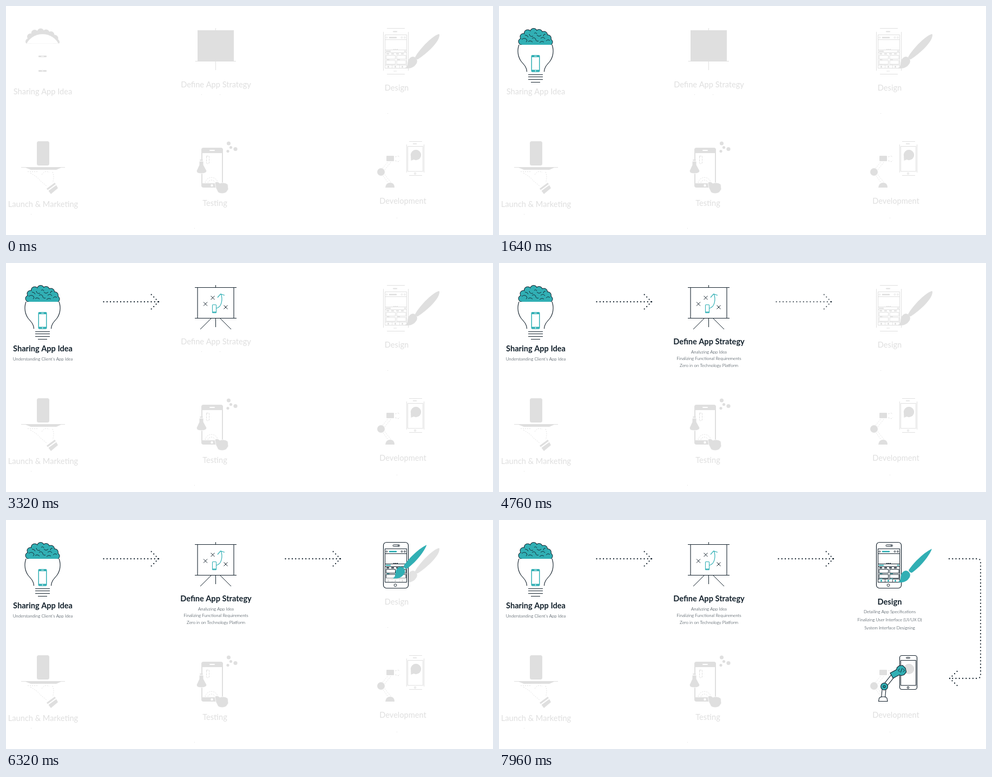
An HTML page with a canvas for the animation above (8000 ms loop, 900 by 425 pixels).

```html
<!DOCTYPE html>
<html lang="en">
<head>
<meta charset="utf-8">
<title>App process</title>
<style>
html, body { margin: 0; width: 100%; height: 100%; overflow: hidden; background: #fff; }
canvas { display: block; width: 900px; height: 425px; }
</style>
</head>
<body>
<canvas id="stage" width="900" height="425"></canvas>
<script>
const LOOP = 8000;
const INK = '#13212c', TEAL = '#31afb4', GREY = '#dfdfdf', WHITE = '#fff';
const ctx = document.getElementById('stage').getContext('2d');

const clamp = v => Math.min(1, Math.max(0, v));
const span = (t, a, b) => clamp((t - a) / (b - a));
const mix = (a, b, p) => a + (b - a) * p;
const easeOut = p => 1 - (1 - p) ** 3;
const easeInOut = p => p * p * (3 - 2 * p);

function layer(alpha, draw) {
  if (alpha <= 0) return;
  ctx.save();
  ctx.globalAlpha *= alpha;
  draw();
  ctx.restore();
}
function clipBox(x, y, w, h) {
  ctx.beginPath();
  ctx.rect(x, y, w, h);
  ctx.clip();
}
function paint(path, fill, stroke, width = 1.1) {
  if (fill) { ctx.fillStyle = fill; ctx.fill(path); }
  if (stroke) { ctx.strokeStyle = stroke; ctx.lineWidth = width; ctx.stroke(path); }
}
const shape = (d, fill, stroke, width) => paint(new Path2D(d), fill, stroke, width);
const line = (d, color = INK, width = 1.1) => shape(d, null, color, width);
function disc(x, y, r, fill, stroke, width) {
  const p = new Path2D();
  p.arc(x, y, r, 0, Math.PI * 2);
  paint(p, fill, stroke, width);
}
function box(x, y, w, h, r, fill, stroke, width) {
  const p = new Path2D();
  p.roundRect(x, y, w, h, r);
  paint(p, fill, stroke, width);
}
function dashed(d, dash, color, width) {
  ctx.save();
  ctx.setLineDash(dash);
  line(d, color, width);
  ctx.restore();
}
function dotted(d) {
  ctx.save();
  ctx.lineCap = 'round';
  ctx.setLineDash([0, 6.28]);
  line(d, INK, 2.3);
  ctx.restore();
}
function text(str, x, y, font, color) {
  ctx.font = font;
  ctx.textAlign = 'center';
  ctx.fillStyle = color;
  ctx.fillText(str, x, y);
}

function label(str, x, y) {
  text(str, x, y, '400 14.6px Lato, sans-serif', GREY);
}
function caption(alpha, title, x, y, lines, firstY, step) {
  layer(1 - alpha, () => label(title, x, y));
  layer(alpha, () => {
    text(title, x, y, '700 14.6px Lato, sans-serif', INK);
    lines.forEach((s, i) => text(s, x, firstY + i * step, '300 8px Lato, sans-serif', INK));
  });
}

// Idea: bulb with brain
const LOBES = [[42, 66, 6], [45, 57, 6], [53, 50.5, 6.5], [64, 48, 6.5],
  [74, 50, 6.5], [83, 53.5, 6.5], [90, 60, 6.5], [93, 67, 6]];
const FOLDS = 'M42 62q5-4 9 0q2 3-1 5 M48 54q5 0 6 4 M56 52q1 6 7 4 M61 60q5-3 7 2q0 4 5 3' +
  ' M54 66q4-3 8 1 M70 54q4 4 8 0 M77 60q5-4 8 1 M75 68q4-4 8-1 M87 65q3-4 7-1 M65 51q3-3 5 1 M82 56q0-4 4-4';
function lobes(color, grow) {
  LOBES.forEach(([x, y, r]) => disc(x, y, r + grow, color));
  shape('M42 73L45 57 54 50 64 48 74 50 84 54 90 60 93 73Z', color);
}
function brain(dy) {
  ctx.save();
  clipBox(30, 35, 75, 37);
  ctx.translate(0, dy);
  lobes(INK, .5);
  lobes(TEAL, -.5);
  line(FOLDS, INK, .9);
  ctx.restore();
}
const DOME = 'M37 72A33.4 33.4 0 0 1 98 72';
function greyIdea() {
  ctx.save();
  clipBox(30, 35, 75, 34.5);
  lobes(GREY, 0);
  shape(DOME + 'Z', WHITE);
  ctx.restore();
  box(60, 92, 15, 3, 1, GREY);
  box(60, 119, 15, 3, 1, GREY);
  box(65, 93, 5, 1, 0, WHITE);
  box(66, 120, 3, 1, 0, WHITE);
}
function idea(t) {
  greyIdea();
  layer(span(t, 20, 400), () => {
    line('M37 72A33.4 33.4 0 0 0 41.5 103.5C47.5 110 51.5 115 51.5 122');
    line('M98 72A33.4 33.4 0 0 1 93.5 103.5C87.500 110 83.5 115 83.5 122');
    line('M54 127.5H81M54 131.5H81M54 136.5H81M59 141.5H76');
    if (t < 1640) line('M37 72H98', INK, .8);
    layer(1 - span(t, 920, 1120), () => {
      ctx.translate(98, 72);
      ctx.rotate(span(t, 600, 1040) * Math.PI / 2);
      ctx.translate(-98, -72);
      line(DOME);
    });
  });
  if (t >= 720) brain(31 * (1 - easeOut(span(t, 720, 1640))));
  if (t >= 600) {
    ctx.save();
    clipBox(52, 85, 32, 41);
    ctx.translate(0, 36 * (1 - easeOut(span(t, 600, 960))));
    box(59.5, 91, 16, 31.5, 2, TEAL);
    box(61, 95, 13, 23.5, 0, WHITE);
    box(65, 92.6, 5, 1, .5, WHITE);
    disc(67.5, 120.5, 1, WHITE);
    ctx.restore();
  }
}

// Strategy: board on an easel
function board(t) {
  box(354, 45, 67, 58, 0, GREY);
  line('M349.5 102.5H425M387.5 41V45M387.5 103V119', GREY, 1);
  layer(span(t, 2800, 2960), () =>
    line('M387.5 41V45M387.5 103V119M379 103L359 123M396 103L416 123', INK, 1));
  if (t < 2960) return;
  const y = mix(45.5, 102.5, easeInOut(span(t, 2960, 3320)));
  ctx.save();
  clipBox(345, 40, 85, y - 39);
  box(354, 45, 67, 58, 0, WHITE);
  line('M354 45V103M421 45V103');
  [[368.5, 76], [382, 64.5], [406, 82]].forEach(([cx, cy]) =>
    line(`M${cx - 3.5} ${cy - 3.5}l7 7m0-7l-7 7`, INK, 1));
  box(381.5, 77.5, 7, 15, 1, WHITE, TEAL);
  line('M381.5 91h7', TEAL, 1.6);
  line('M389 84C398 82 401 69 397.5 58M391 64L396.5 57.5 404 60', TEAL, 1.2);
  ctx.restore();
  line(`M349 45.5H426M349 ${y}H426`);
}

// Design: phone and brush
function screen(ink, accent) {
  box(700.5, 53.5, 40, 62, 0, null, ink, 1);
  line('M700.5 62.5h40M700.5 81.5h40M700.5 86.5h40M700.5 109.5h40', ink, 1);
  disc(703.5, 58.5, 1.3, null, ink, .9);
  box(708, 57.3, 14, 2.6, 0, accent);
  disc(731.5, 58.5, 1.4, null, ink, .9);
  disc(737, 58.5, 1.4, null, ink, .9);
  dashed('M716 80.5h9', [2, 1], ink, 1.4);
  box(702, 83, 9, 2, 0, accent);
  box(736, 83, 3, 2, 0, accent);
  dashed('M703 88.8h36', [5, 4], ink, 2);
  for (let i = 0; i < 4; i++) {
    const x = 702.5 + i % 2 * 19.5, y = 91.5 + (i >> 1) * 9.5;
    box(x, y, 17, 7, 0, WHITE, ink, 1);
    line(`M${x + 1} ${y + 8.3}h5`, accent, 1.2);
  }
  dashed('M705 112.8h33', [3, 10], accent, 3);
  line('M713.5 110v5M727.5 110v5', ink, .8);
}
const BRISTLES = 'M737 115C745 113 740 104 745 98Q751 91 757 96Q763 102 757 109C752 116 742 117 737 115Z';
const BRUSH_KEYS = [[4840, 700, 24], [5000, 703, 61], [5280, 736, 67], [5520, 703, 75],
  [5800, 714, 84], [6000, 738, 93], [6220, 704, 104], [6480, 738, 115]];
function brushTip(t) {
  let i = 0;
  while (i < BRUSH_KEYS.length - 2 && t >= BRUSH_KEYS[i + 1][0]) i++;
  const [a, ax, ay] = BRUSH_KEYS[i], [b, bx, by] = BRUSH_KEYS[i + 1];
  const p = easeInOut(span(t, a, b));
  return [mix(ax, bx, p), mix(ay, by, p)];
}
function design(t) {
  line('M697.5 48V120M743.5 48V120M704 41.5H737M704 126.5H737', GREY, 1);
  box(715, 46.5, 8, 2, 1, GREY);
  dashed('M717 121h6', [1, 2], GREY, 3);
  layer(1 - span(t, 6300, 6480), () => {
    shape('M800 52C790 54 765 78 756 95Q757 99 761 99C778 88 802 66 801 53Z', GREY);
    shape(BRISTLES, GREY);
  });
  layer(span(t, 4800, 4960), () => {
    box(697.5, 41.5, 46, 85, 5.5, WHITE, INK, 1.2);
    box(715, 46, 12.5, 3, 1.5, null, INK, 1);
    disc(725, 47.5, .9, INK);
    box(717.3, 118.8, 4.4, 4.4, 1.5, null, INK, 1);
  });
  screen(GREY, GREY);
  if (t < 4840) return;
  const [x, y] = brushTip(t);
  layer(span(t, 4880, 4960), () => box(700.5, 53.5, 40, 62, 0, null, INK, 1));
  ctx.save();
  clipBox(698, 50, 46, Math.max(0, t >= 6480 ? 70 : y - 50));
  screen(INK, TEAL);
  ctx.restore();
  ctx.save();
  ctx.translate(x - 738, y - 115);
  shape('M800 53.5C787 59 767 78 757 93Q758 97 762.5 98C773 92 794 70 800 53.5Z', TEAL);
  shape(BRISTLES, TEAL);
  ctx.restore();
}

// Development: robot arm and phone
function greyDevelopment() {
  line('M740.5 257V309M772.5 257V309M745 251.5H769M745 314.5H769', GREY, 1);
  box(742.5, 260.5, 28, 46.5, 0, null, GREY, 1);
  box(752, 255, 7, 1.5, .5, GREY);
  disc(756, 311, 1.5, null, GREY, 1);
  disc(757.5, 276.5, 9.7, GREY);
  shape('M748 279L748.5 287 756 284Z', GREY);
  disc(693, 308, 7, GREY);
  shape('M701 337Q702 328 710 328Q718 328 718 337Z', GREY);
  box(703, 278, 14, 10, 1, GREY);
  dashed('M696 301L706 289M700 304L712 289M697 315L706 328M700 313L711 327', [2, 2], GREY, .9);
  dashed('M719 280L725 278.5 728 281M719 287L725 289 728 286', [3, 2], GREY, .9);
}
function limb(x1, y1, x2, y2, w) {
  const d = `M${x1} ${y1}L${x2} ${y2}`;
  line(d, INK, w);
  line(d, WHITE, w - 2.2);
}
function development(t) {
  greyDevelopment();
  layer(span(t, 7520, 7720), () => {
    box(740.5, 251.5, 32, 63, 4, null, INK, 1.2);
    box(742.5, 260.5, 28, 46.5, 0, null, INK, 1);
    box(752.5, 254.8, 7, 2, 1, null, INK, .9);
    disc(756, 311, 1.7, null, INK, 1);
  });
  layer(span(t, 7380, 7500), () => {
    const p = easeInOut(span(t, 7500, 7960));
    const jx = mix(693, 712, p), jy = mix(308, 309, p);
    const hx = mix(710, 730, p), hy = mix(283, 286.5, p);
    const tilt = mix(0, -.5, p);
    limb(710, 331, jx, jy, 8);
    shape('M701.5 336.5L702.5 331Q704 328 710 328Q716 328 717 331L718 336.5Z', WHITE, INK);
    limb(jx, jy, hx, hy, 8);
    disc(jx, jy, 6.5, TEAL, INK);
    disc(jx, jy, 2, null, INK);
    ctx.translate(hx, hy);
    ctx.rotate(tilt);
    shape('M-5-5.5H8L11-8.500 16-9.500 22-7 24 0 22 7 16 9.5 11 8.5 8 5.5H-5Z', TEAL, INK);
    ctx.translate(15.5, 0);
    ctx.rotate(-tilt);
    line('M-3-3L-6 0-3 3M3-3L6 0 3 3M1.5-4L-1.5 4', INK, 1);
  });
}

function testing() {
  box(362, 264, 38, 72, 4, null, GREY, 2);
  box(361, 263, 40, 10, [4, 4, 0, 0], GREY);
  box(361, 329, 40, 8, [0, 0, 4, 4], GREY);
  box(376, 267, 10, 2, 1, WHITE);
  disc(380.5, 333, 2.2, WHITE);
  dashed('M370 278.5H376M370.5 279V291Q373 295 375.5 291V279', [4, 1.5], GREY, 1);
  dashed('M368 328A12 12 0 0 1 391 326M373 328A7 7 0 0 1 386 327', [2, 2], GREY, 1);
  shape('M357 288H365V295L371 306Q370 311 361 311Q352 311 352 306L357 295Z', GREY, WHITE, 1);
  box(358, 285, 6, 2, 1, GREY);
  [[411.5, 255, 3.5], [415.5, 262.5, 2.6], [424, 265.5, 3.6], [410, 269.5, 2.6]]
    .forEach(([x, y, r]) => disc(x, y, r, GREY));
  shape('M386 328Q390 324 395 329Q403 326 410 331L411 340 407 346Q399 350 392 346L388 338Z', GREY, WHITE, .8);
}

function launch() {
  box(57, 251, 23, 45, 3.5, GREY);
  line('M28 299.5H109', GREY, 1);
  shape('M36 300H102L93 304H46Z', GREY);
  dashed('M40 307.5H58M45 310Q58 317 63 324L75 334M86 308Q90 318 86 328M66 313Q72 304 80 309', [2, 2], GREY, .9);
  shape('M75 339L90 328 92 330.5 77 341.5ZM78.5 343L93 332.5 96 338 83 349Z', GREY);
}

const SPECKS = [[361, 164], [395, 164], [705, 199], [46, 386], [348, 412], [722, 393]];
function arrow(t, start, x) {
  const p = span(t, start, start + 280);
  layer(p, () => {
    ctx.translate(x - 14 * (1 - p), 0);
    dotted('M0.5 72H102');
    dotted('M102 72L87.5 57.5');
    dotted('M102 72L87.5 86.5');
  });
}
function returnArrow(t) {
  const p = span(t, 7000, 7320);
  layer(p, () => {
    ctx.translate(14 * (1 - p), 0);
    dotted('M832 72H884Q890 72 890 78V287Q890 294 884 294H833');
    dotted('M833 294L848 279.5');
    dotted('M833 294L848 308.5');
  });
}

function render(t) {
  ctx.fillStyle = WHITE;
  ctx.fillRect(0, 0, 900, 425);
  SPECKS.forEach(([x, y]) => box(x, y, 1, 1, 0, GREY));
  idea(t);
  board(t);
  design(t);
  development(t);
  testing();
  launch();
  caption(span(t, 2240, 2500), 'Sharing App Idea', 68, 163.5,
    ["Understanding Client's App Idea"], 180.5, 13);
  caption(span(t, 4120, 4480), 'Define App Strategy', 388, 151,
    ['Analyzing App Idea', 'Finalizing Functional Requirements', 'Zero in on Technology Platform'], 167.5, 12.8);
  caption(span(t, 6560, 6960), 'Design', 722, 157,
    ['Detailing App Specifications', 'Finalizing User Interface (UI/UX D)', 'System Interface Designing'], 173, 15);
  label('Launch & Marketing', 68.5, 372.5);
  label('Testing', 386, 371);
  label('Development', 733.5, 367);
  arrow(t, 2440, 180);
  arrow(t, 4560, 516);
  returnArrow(t);
}

const began = performance.now();
function tick() {
  render((performance.now() - began) % LOOP);
  requestAnimationFrame(tick);
}
tick();
</script>
</body>
</html>
```
